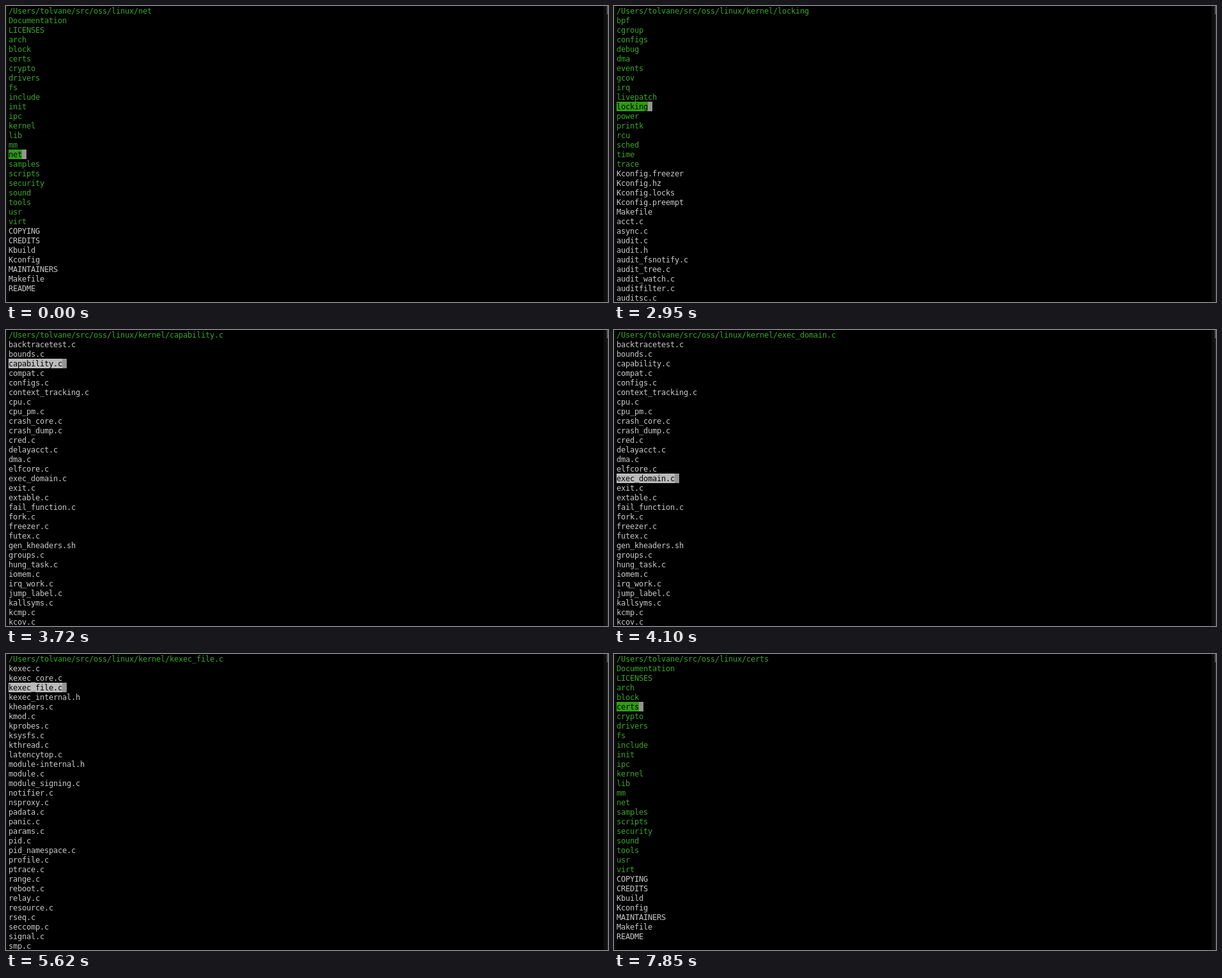
These frames come from a looping animation (942 px wide and 464 px high, 8000 ms). An HTML page with a canvas:

```html
<!DOCTYPE html>
<html lang="en">
<head>
<meta charset="utf-8">
<title>Terminal file browser</title>
<style>
  html, body { margin: 0; width: 100%; height: 100%; overflow: hidden; background: #000; }
  canvas { display: block; }
</style>
</head>
<body>
<canvas id="screen" width="942" height="464"></canvas>
<script>
const ctx = document.getElementById('screen').getContext('2d');

const LOOP = 8000;
const CELL_W = 7, CELL_H = 15, LEFT = 4, BASELINE = 12;
const PAGE = 30;
const GREEN = '#3aa626', GREEN_BAR = '#2f9c12';
const WHITE = '#cacaca', WHITE_BAR = '#bababa', CURSOR = '#949494';

const words = text => text.trim().split(/\s+/);

function folder(path, dirs, files) {
  const dirNames = words(dirs);
  return { path, dirCount: dirNames.length, names: [...dirNames, ...words(files)] };
}

const root = folder('/Users/tolvane/src/oss/linux/',
  `Documentation LICENSES arch block certs crypto drivers fs include init ipc
   kernel lib mm net samples scripts security sound tools usr virt`,
  'COPYING CREDITS Kbuild Kconfig MAINTAINERS Makefile README');

const kernel = folder(root.path + 'kernel/',
  `bpf cgroup configs debug dma events gcov irq livepatch locking power printk
   rcu sched time trace`,
  `Kconfig.freezer Kconfig.hz Kconfig.locks Kconfig.preempt Makefile acct.c
   async.c audit.c audit.h audit_fsnotify.c audit_tree.c audit_watch.c
   auditfilter.c auditsc.c
   backtracetest.c bounds.c capability.c compat.c configs.c context_tracking.c
   cpu.c cpu_pm.c crash_core.c crash_dump.c cred.c delayacct.c dma.c elfcore.c
   exec_domain.c exit.c extable.c fail_function.c fork.c freezer.c futex.c
   gen_kheaders.sh groups.c hung_task.c iomem.c irq_work.c jump_label.c
   kallsyms.c kcmp.c kcov.c
   kexec.c kexec_core.c kexec_file.c kexec_internal.h kheaders.c kmod.c
   kprobes.c ksysfs.c kthread.c latencytop.c module-internal.h module.c
   module_signing.c notifier.c nsproxy.c padata.c panic.c params.c pid.c
   pid_namespace.c profile.c ptrace.c range.c reboot.c relay.c resource.c
   rseq.c seccomp.c signal.c smp.c`);

// Single key presses: time, folder, selected name
const presses = [
  [0, root, 'net'], [20, root, 'samples'], [820, root, 'net'],
  [1000, root, 'mm'], [1300, root, 'lib'], [1390, root, 'kernel'],
  [2020, kernel, 'bpf'], [2350, kernel, 'cgroup'],
  [4783, kernel, 'kheaders.c'], [5400, kernel, 'kexec_internal.h'],
  [5600, kernel, 'kexec_file.c'],
  [5950, root, 'Documentation'], [7270, root, 'LICENSES'], [7390, root, 'arch'],
  [7650, root, 'block'], [7780, root, 'certs']
];

// Held down key: time, selected index
const held = [
  [2700, 2], [3450, 25], [3500, 26], [3520, 27],
  [4100, 44], [4600, 59], [4650, 60], [4783, 64]
];

function stateAt(t) {
  const next = held.findIndex(([time]) => time > t);
  if (next > 0) {
    const [t0, i0] = held[next - 1], [t1, i1] = held[next];
    return { dir: kernel, index: Math.floor(i0 + (i1 - i0) * (t - t0) / (t1 - t0) + 1e-6) };
  }
  const [, dir, name] = presses.filter(([time]) => time <= t).pop();
  return { dir, index: dir.names.indexOf(name) };
}

function fill(x, y, w, h, color) {
  ctx.fillStyle = color;
  ctx.fillRect(x, y, w, h);
}

function bar(column, row, length, color) {
  fill(LEFT + column * CELL_W, row * CELL_H, length * CELL_W, CELL_H, color);
}

function print(text, row, color) {
  ctx.fillStyle = color;
  [...text].forEach((char, i) =>
    ctx.fillText(char, LEFT + (i + 0.5) * CELL_W, row * CELL_H + BASELINE));
}

function drawWindow() {
  fill(0, 0, 942, 464, '#000');
  fill(0, 0, 4, 464, '#0b0b0b');
  fill(935, 0, 5, 464, '#0e0e0e');
  fill(940, 0, 2, 464, '#1d1d1d');
  fill(940, 0, 2, 13, '#555');
}

function draw(t) {
  const { dir, index } = stateAt(t);
  const first = Math.floor(index / PAGE) * PAGE;
  const path = dir.path + dir.names[index];

  drawWindow();
  ctx.font = '12px "DejaVu Sans Mono", "Noto Sans Mono", monospace';
  ctx.textAlign = 'center';
  print(path, 0, GREEN);

  dir.names.slice(first, first + PAGE).forEach((name, i) => {
    const isDir = first + i < dir.dirCount;
    const selected = first + i === index;
    if (selected) bar(0, i + 1, name.length, isDir ? GREEN_BAR : WHITE_BAR);
    print(name, i + 1, selected ? '#000' : isDir ? GREEN : WHITE);
  });

  // A freshly opened folder leaves the cursor behind the path
  if (index === 0) bar(path.length, 0, 1, CURSOR);
  else bar(dir.names[index].length, index - first + 1, 1, CURSOR);
}

function frame() {
  draw(performance.now() % LOOP);
  requestAnimationFrame(frame);
}
frame();
</script>
</body>
</html>
```
